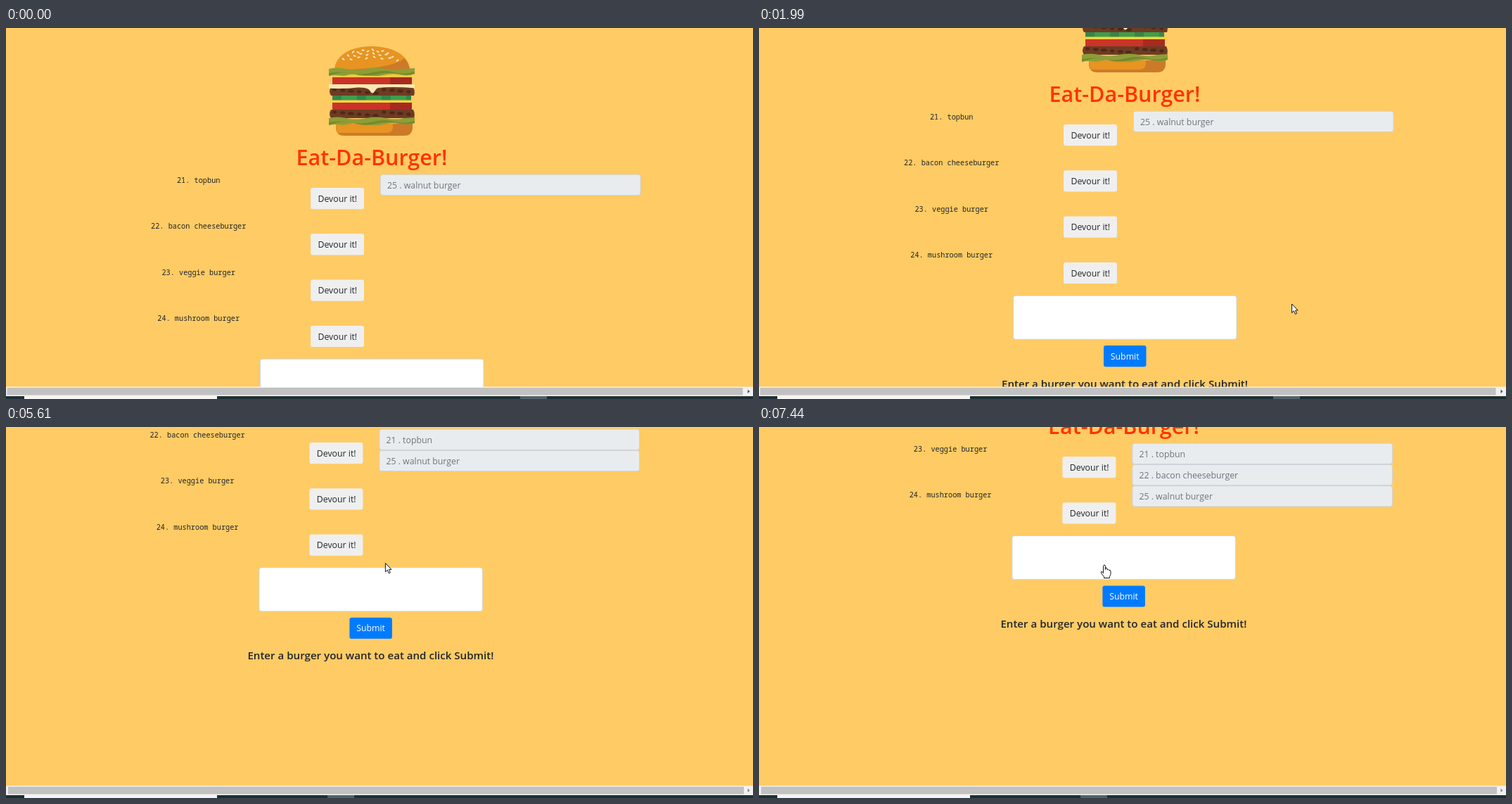
Recreate the animation shown at these times as an HTML page. Size 1062 by 527 pixels, loop 8 s.

```html
<!DOCTYPE html>
<html lang="en">
<head>
<meta charset="utf-8">
<title>Burger list</title>
<style>
html, body { margin: 0; width: 100%; height: 100%; overflow: hidden; background: #fecb65; }
svg { display: block; width: 1062px; height: 527px; }
text { font: 12.3px "Open Sans", "Noto Sans", sans-serif; fill: #212529; text-anchor: middle; }
.title { font-size: 30.5px; font-weight: 600; fill: #ff3300; }
.mono { font: 10.25px "Noto Sans Mono", "DejaVu Sans Mono", monospace; }
.prompt { font-size: 15.1px; font-weight: 600; }
.eaten { text-anchor: start; fill: #6c757d; }
.submit { fill: #fff; }
</style>
</head>
<body>
<svg viewBox="0 0 1062 527">
  <defs>
    <g id="patty">
      <path d="M462 0H579Q582 6 580 12H462Q458 6 462 0Z" fill="#6e3b23"/>
      <g id="spots" fill="#4f2818"/>
    </g>
    <g id="lettuce">
      <path d="M459 1Q470-2 484 1T512 1T540 1T566 1L581 0V8Q572 12 560 9Q548 7 536 10T508 9Q494 7 480 11Q468 9 459 11Z" fill="#8f9d36"/>
      <path d="M459 7Q474 4 490 7T522 6T552 6T581 5V8Q568 11 556 8T526 9T494 8T459 11Z" fill="#748a2d"/>
    </g>
    <g id="tomato">
      <path d="M464 0H577V10H464Z" fill="#c93427"/>
      <path d="M546 0H577V10H546Z" fill="#a72a20"/>
    </g>
    <g id="burger">
      <path d="M467 60C467 40 489 26 520 26S574 40 574 60Z" fill="#e79422"/>
      <path d="M467 60C500 58 548 58 566 43Q574 51 574 60Z" fill="#cd7a28"/>
      <g id="seeds" fill="#fbe7bd"/>
      <path d="M464 64H577V69.5H464Z" fill="#f2c83c"/>
      <use href="#lettuce" y="57"/>
      <use href="#tomato" y="70"/>
      <use href="#patty" y="84"/>
      <path d="M459 80H581V85.5Q550 83 529 85Q526 86 524 90Q521 95 518 90Q515 84 500 84.5Q478 87 459 85.5Z" fill="#f9eab4"/>
      <path d="M464 96H576V103H464Z" fill="#3f9d4c"/>
      <path d="M464 99.5H576" stroke="#33864a" stroke-width="7" stroke-dasharray="13 22"/>
      <path d="M461 102.5H579V106H461Z" fill="#f4d341"/>
      <use href="#tomato" y="106"/>
      <use href="#patty" y="116"/>
      <path d="M469 136H578V143Q577 153 566 153H481Q470 153 469 143Z" fill="#cd7a28"/>
      <path d="M469 136H550V142Q549 149 541 149H472Q469 145 469 136Z" fill="#e79422"/>
      <use href="#lettuce" y="127"/>
    </g>
  </defs>
  <rect width="1062" height="510" fill="#fecb65"/>
  <g id="page"/>
  <rect y="509.6" width="1062" height="14" fill="#f1f1f1"/>
  <rect id="thumb" y="511" width="1046" height="10.5"/>
  <path id="arrowhead" d="M1054.5 513.5L1057.5 516.2L1054.5 519Z"/>
  <rect y="523" width="1062" height="4" fill="#1d2f33"/>
  <rect x="26" y="523" width="274" height="4" fill="#f4f4f4"/>
  <rect id="task" y="523" width="38" height="4" fill="#526268"/>
  <g id="pointer" fill="#fff" stroke="#111" stroke-linejoin="round">
    <circle id="glow" cy="1" r="9.5" fill="#f6f000" stroke="none"/>
    <path id="arrow" d="M.4.4V12.8L3.3 10.2L5.3 14.8L7.3 13.9L5.4 9.4H9Z"/>
    <path id="hand" d="M-1.4 11V1.2Q-1.4-.4 0-.4T1.4 1.2V6Q3 0 4.2 6.4Q6 5 6.6 7Q9 6 9 9V12Q9 14 7.4 16V18H-.4V16.2Q-2 15-4.6 10.6Q-5 8.6-3 9Z"/>
  </g>
</svg>
<script>
const $ = id => document.getElementById(id);
const LOOP = 8000, TOP = 208.3, PITCH = 65.3, BUTTON = { x: 433, y: 227, w: 76, h: 30.2 };
const menu = ["21. topbun", "22. bacon cheeseburger", "23. veggie burger", "24. mushroom burger"];

// each step: start, duration, values to reach
const steps = [
  [430, 250, { x: 767, y: 399 }],
  [1335, 365, { scroll: 90 }],
  [1984, 250, { x: 570, y: 251 }],
  [2710, 710, { x: 486.5, y: 159 }],
  [3670, 0, { clicked: 3670 }],
  [3860, 0, { scroll: 211, gone: 1 }],
  [4990, 180, { x: 539, y: 193 }],
  [5600, 530, { scroll: 51 }],
  [6520, 350, { x: 491, y: 196.5 }],
  [7130, 0, { clicked: 7130 }],
  [7300, 0, { scroll: 185, gone: 2 }],
];
const easeOut = p => 1 - (1 - p) ** 1.8;

function stateAt(t) {
  const state = { x: 930, y: 540, scroll: 0, gone: 0, clicked: -LOOP };
  for (const [at, time, goal] of steps) {
    if (t < at) break;
    const p = time ? easeOut(Math.min(1, (t - at) / time)) : 1;
    for (const key in goal) state[key] += (goal[key] - state[key]) * p;
  }
  return state;
}

const box = (x, y, w, h, fill, stroke = "none") =>
  `<rect x="${x}" y="${y}" width="${w}" height="${h}" rx="3.2" fill="${fill}" stroke="${stroke}"/>`;
const label = (x, y, s, cls = "") => `<text x="${x}" y="${y}" class="${cls}">${s}</text>`;
const oval = (x, y, rx, ry, turn) =>
  `<ellipse rx="${rx}" ry="${ry}" transform="translate(${x} ${y}) rotate(${turn})"/>`;
const repeat = (n, make) => Array.from({ length: n }, (_, i) => make(i)).join("");

function pageMarkup(gone) {
  const rows = menu.slice(gone), form = TOP + rows.length * PITCH;
  const eaten = [...menu.slice(0, gone), "25. walnut burger"];
  const row = (s, i) => label(273.7, 220 + i * PITCH, s, "mono") +
    box(BUTTON.x, BUTTON.y + i * PITCH, BUTTON.w, BUTTON.h, "#efefef") +
    label(471.3, 246.7 + i * PITCH, "Devour it!");
  const entry = (s, i) => box(532.5, TOP + i * 30.2, 369.5, 29.2, "#e9ecef", "#ced4da") +
    label(542, TOP + 19.3 + i * 30.2, s.replace(".", " ."), "eaten");
  return '<use href="#burger"/>' + label(520, 195.3, "Eat-Da-Burger!", "title") +
    rows.map(row).join("") + eaten.map(entry).join("") +
    box(361.5, form + .7, 317.5, 62, "#fff", "#ced4da") +
    box(490, form + 71.5, 60.5, BUTTON.h, "#007bff") +
    label(520.2, form + 91.2, "Submit", "submit") +
    label(520, form + 131.2, "Enter a burger you want to eat and click Submit!", "prompt");
}

$("spots").innerHTML = repeat(10, i => oval(467 + i * 11.7, 3.5 + i * 7 % 6, 3 + i % 3 * .7, 2.2, 0));
$("seeds").innerHTML = repeat(24, i => {
  const d = i % 8 - 3.5, arc = Math.floor(i / 8);
  return oval(518 + d * (7 + arc * 2), 31 + arc * 5 + d * d * .25 + i % 2 * 2, 2.3, 1.1, i * 67 % 90 - 45);
});

let shown = -1;
function draw(t) {
  const { x, y, scroll, gone, clicked } = stateAt(t);
  const dx = gone ? -1.6 : 0;
  if (gone !== shown) $("page").innerHTML = pageMarkup(shown = gone);
  $("page").setAttribute("transform", `translate(${dx} ${-scroll})`);

  $("thumb").setAttribute("x", gone ? 3 : 1.5);
  $("thumb").setAttribute("fill", y > 510 && y < 523 ? "#a8a8a8" : "#c1c1c1");
  $("arrowhead").setAttribute("fill", gone ? "#858585" : "#505050");
  $("task").setAttribute("x", gone ? 457 : 731);

  const bx = x - BUTTON.x - dx, by = y + scroll - BUTTON.y;
  const overButton = bx > 0 && bx < BUTTON.w && by > 0 && by < menu.length * PITCH && by % PITCH < BUTTON.h;
  // the hand stays after a reload until the mouse moves again
  const hand = overButton || gone === 2;
  $("pointer").setAttribute("transform", `translate(${x} ${y})`);
  $("hand").style.display = hand ? "" : "none";
  $("arrow").style.display = hand ? "none" : "";
  $("glow").setAttribute("opacity", .6 * Math.max(0, Math.min(1, (270 - t + clicked) / 170)));
}

const start = performance.now();
function frame() {
  draw((performance.now() - start) % LOOP);
  requestAnimationFrame(frame);
}
frame();
</script>
</body>
</html>
```
